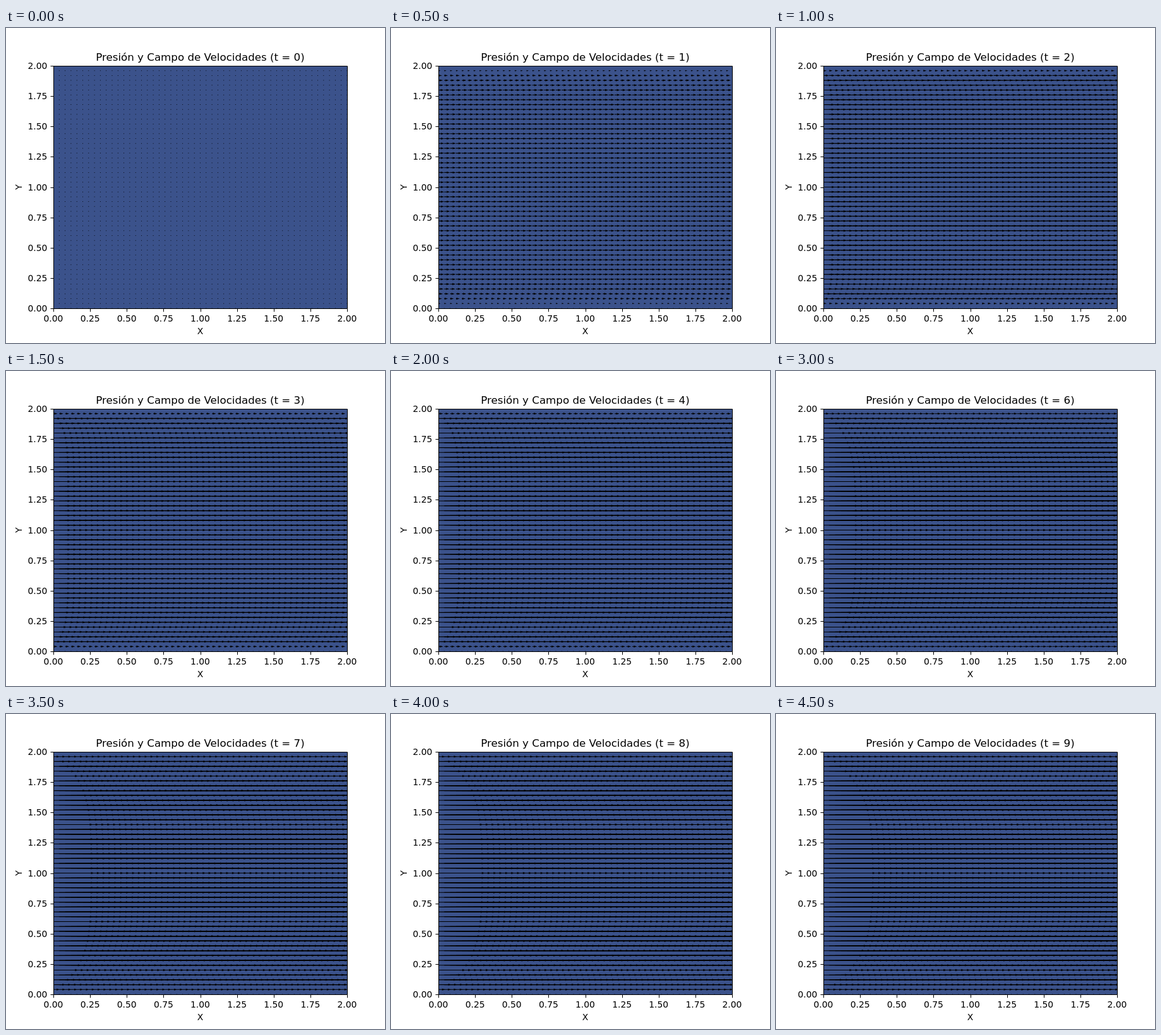
Write an HTML page with a canvas that moves like this. It is 600x500 px and loops after 5 s.

```html
<!DOCTYPE html>
<html lang="es">
<head>
<meta charset="utf-8">
<title>Presión y Campo de Velocidades</title>
<style>
  html, body { margin: 0; width: 100%; height: 100%; overflow: hidden; background: #fff; }
  canvas, svg { position: absolute; left: 0; top: 0; display: block; }
  text { font-family: "DejaVu Sans", sans-serif; font-size: 13.889px; fill: #000; text-anchor: middle; }
  #title { font-size: 16.667px; }
  #axes { stroke: #000; stroke-width: 1; fill: none; }
</style>
</head>
<body>
<canvas id="field" width="600" height="500"></canvas>
<svg id="chart" width="600" height="500" viewBox="0 0 600 500">
  <path id="axes"/>
  <text id="title" x="307.5" y="52"></text>
  <text x="307.5" y="486">X</text>
  <text transform="translate(25 252.5) rotate(-90)">Y</text>
</svg>
<script>
const LEFT = 75, TOP = 60, WIDTH = 465, HEIGHT = 385, BOTTOM = TOP + HEIGHT;
const CELLS = 50, STEPS = 10, STEP_MS = 500;
const PX_PER_UNIT = WIDTH / 5;       // arrow length for unit speed
const SHAFT = WIDTH * 0.06 / 25;     // arrow shaft width
const HEAD = { length: 5, axis: 4.5, width: 3 };

const ctx = document.getElementById('field').getContext('2d');
const chart = document.getElementById('chart');
const title = document.getElementById('title');

function addLabel(value, x, y, anchor) {
  const label = document.createElementNS(chart.namespaceURI, 'text');
  label.setAttribute('x', x);
  label.setAttribute('y', y);
  label.style.textAnchor = anchor;
  label.textContent = value.toFixed(2);
  chart.append(label);
}

function drawAxes() {
  const crisp = v => Math.round(v) + 0.5;
  let d = `M${LEFT + 0.5} ${TOP + 0.5}h${WIDTH}v${HEIGHT}h${-WIDTH}z`;
  for (let i = 0; i <= 8; i++) {
    const x = LEFT + WIDTH * i / 8, y = BOTTOM - HEIGHT * i / 8;
    d += `M${crisp(x)} ${BOTTOM + 0.5}v5M${LEFT + 0.5} ${crisp(y)}h-5`;
    addLabel(i / 4, x, 466, 'middle');
    addLabel(i / 4, 65.3, Math.round(y) + 5, 'end');
  }
  document.getElementById('axes').setAttribute('d', d);
}

// Channel flow from rest: constant push, viscosity 0.1, no slip at the walls.
function solveProfiles() {
  const dt = 0.001, dy = 2 / CELLS, k = 0.1 * dt / dy ** 2;
  let u = new Array(CELLS + 1).fill(0);
  const profiles = [u];
  while (profiles.length < STEPS) {
    for (let n = 0; n < 100; n++) {
      u = u.map((v, j) => j % CELLS ? v + dt + k * (u[j + 1] - 2 * v + u[j - 1]) : 0);
    }
    profiles.push(u);
  }
  return profiles;
}

function arrowPath(length) {
  const path = new Path2D();
  const size = length / SHAFT;
  let points;
  if (size < 1) {
    points = Array.from({ length: 6 }, (_, i) =>
      [Math.cos(i * Math.PI / 3) / 2, Math.sin(i * Math.PI / 3) / 2]);
  } else {
    const full = Math.max(size, HEAD.length), shrink = size / full;
    const upper = [[0, 0.5], [full - HEAD.axis, 0.5], [full - HEAD.length, HEAD.width / 2], [full, 0]];
    const lower = upper.slice(0, 3).reverse().map(([x, y]) => [x, -y]);
    points = [...upper, ...lower].map(([x, y]) => [x * shrink, y * shrink]);
  }
  for (const [x, y] of points) path.lineTo(x * SHAFT, y * SHAFT);
  path.closePath();
  return path;
}

const profiles = solveProfiles();

function drawField(step) {
  ctx.setTransform(1, 0, 0, 1, 0, 0);
  ctx.fillStyle = '#3b528b';
  ctx.fillRect(LEFT, TOP, WIDTH, HEIGHT);
  ctx.fillStyle = '#000';
  profiles[step].forEach((speed, row) => {
    const arrow = arrowPath(speed * PX_PER_UNIT);
    const y = BOTTOM - row * HEIGHT / CELLS;
    for (let col = 0; col <= CELLS; col++) {
      ctx.setTransform(1, 0, 0, 1, LEFT + col * WIDTH / CELLS, y);
      ctx.fill(arrow);
    }
  });
  title.textContent = `Presión y Campo de Velocidades (t = ${step})`;
}

drawAxes();
ctx.beginPath();
ctx.rect(LEFT, TOP, WIDTH, HEIGHT);
ctx.clip();

const start = performance.now();
let shown = -1;
function tick() {
  const step = Math.floor((performance.now() - start) / STEP_MS) % STEPS;
  if (step !== shown) drawField(shown = step);
  requestAnimationFrame(tick);
}
tick();
</script>
</body>
</html>
```
